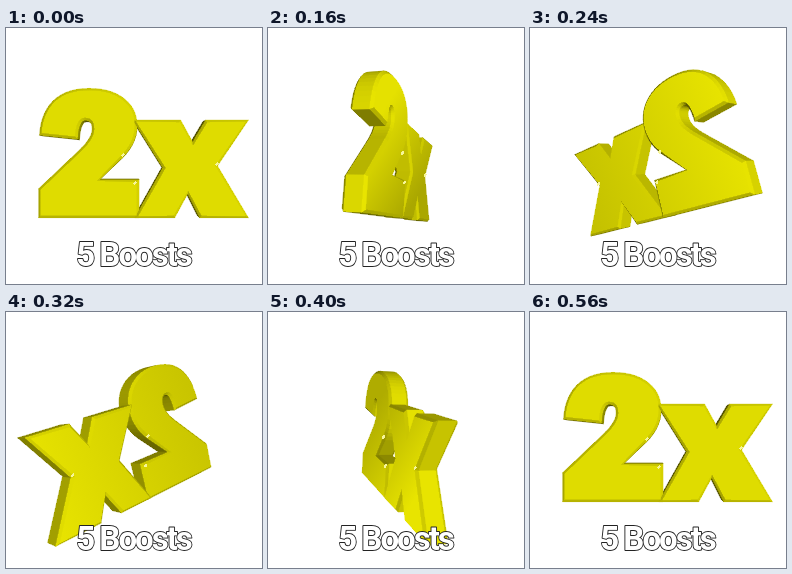
Write an HTML page that moves like this. It is 256 px wide and 256 px high and loops after 600 ms.

```html
<!DOCTYPE html>
<html>
<head>
<meta charset="utf-8">
<style>
  html, body { margin: 0; width: 100%; height: 100%; overflow: hidden; background: #fff; }
  svg { display: block; width: 100vw; height: 100vh; }
  text {
    font: 700 33px "Roboto", "Liberation Sans", sans-serif;
    font-stretch: 75%; letter-spacing: -2px;
    fill: #fff; stroke: #222; stroke-width: 1.8; stroke-linejoin: round;
    paint-order: stroke; text-anchor: middle;
  }
</style>
</head>
<body>
<svg viewBox="0 0 256 256">
  <defs>
    <linearGradient id="face" gradientUnits="userSpaceOnUse">
      <stop offset="0"/><stop offset="1"/>
    </linearGradient>
  </defs>
  <g id="solid" stroke-width=".6" stroke-linejoin="round" shape-rendering="crispEdges"></g>
  <text x="127.5" y="238">5 Boosts</text>
</svg>
<script>
const STEP = 40, STEPS = 15, MID = 128, CAMERA = 400;
const HALF = 10, BEVEL = 2.5, FIT = 1 - HALF / CAMERA;
const solid = document.getElementById('solid');
const gradient = document.getElementById('face');

// Outlines run clockwise: [x, y] is a line, [cx, cy, x, y] a quadratic curve.
const two = [[33, 107], [34, 86, 46, 73], [59, 60, 83, 60], [106, 60, 119, 71], [131, 81, 131, 97],
  [131, 115, 116, 130], [93, 152], [133, 152], [133, 190], [32, 190], [32, 161], [72, 123],
  [86, 110, 86, 101], [86, 92, 79, 92], [72, 92, 71, 111]];
const ex = [[127, 92], [175, 92], [187, 114], [200, 92], [243, 92], [212, 138], [243, 190],
  [194, 190], [182, 166], [169, 190], [129, 190], [157, 140]];
const glints = [[117, 127], [129, 155], [211, 136]];

const ease = p => p * p * (3 - 2 * p);
const local = ([x, y]) => [(x - MID) * FIT, (y - MID) * FIT];

function flatten(path) {
  const out = [];
  let [px, py] = path[0];
  for (const seg of path) {
    const [x, y] = seg.slice(-2);
    if (seg.length === 2) out.push([x, y]);
    else for (let i = 1; i <= 7; i++) {
      const t = i / 7, a = (1 - t) ** 2, b = 2 * t * (1 - t), c = t * t;
      out.push([a * px + b * seg[0] + c * x, a * py + b * seg[1] + c * y]);
    }
    [px, py] = [x, y];
  }
  return out.map(local);
}

function makeGlyph(path) {
  const pts = flatten(path), n = pts.length;
  const normals = pts.map((p, i) => {
    const q = pts[(i + 1) % n], dx = q[0] - p[0], dy = q[1] - p[1], l = Math.hypot(dx, dy);
    return [dy / l, -dx / l];
  });
  const inner = pts.map((p, i) => {
    const a = normals[(i + n - 1) % n], b = normals[i];
    const k = BEVEL / Math.max(0.6, 1 + a[0] * b[0] + a[1] * b[1]);
    return [p[0] - (a[0] + b[0]) * k, p[1] - (a[1] + b[1]) * k];
  });
  const ring = (list, z) => list.map(p => [...p, z]);
  const edge = HALF - BEVEL;
  return { normals, rings: [ring(inner, HALF), ring(pts, edge), ring(pts, -edge), ring(inner, -HALF)] };
}

const glyphs = [two, ex].map(makeGlyph);

function turner(spin, roll) {
  const c = Math.cos(spin), s = Math.sin(spin), cr = Math.cos(roll), sr = Math.sin(roll);
  return ([x, y, z]) => {
    const u = x * cr - y * sr, v = x * sr + y * cr;
    return [u * c + z * s, v, z * c - u * s];
  };
}

function project([x, y, z]) {
  const k = CAMERA / (CAMERA - z);
  return [MID + x * k, MID + y * k];
}

function area(poly) {
  return poly.reduce((sum, [x, y], i) => {
    const [u, v] = poly[(i + 1) % poly.length];
    return sum + x * v - u * y;
  }, 0);
}

function yellow(k) {
  k = Math.min(1, k);
  return `rgb(${Math.round(232 * k)},${Math.round(228 * k)},0)`;
}

// Sides take light from the right; nearer parts are brighter.
function sideColor([x, y, z], depth) {
  const lit = Math.max(0, z * 0.92 + x * 0.28 - y * 0.1);
  return yellow(0.36 + 0.62 * Math.min(1, lit) ** 0.7 + depth * 0.0006);
}

function lightFace(turn, z, facing) {
  [-96, 116].forEach((x, i) => {
    const end = turn([x, 0, z]), [px, py] = project(end);
    gradient.setAttribute('x' + (i + 1), px);
    gradient.setAttribute('y' + (i + 1), py);
    gradient.children[i].setAttribute('stop-color', yellow(0.83 + 0.12 * facing + end[2] * 0.0013));
  });
}

const pathOf = poly => 'M' + poly.map(p => p.map(v => v.toFixed(2)).join()).join('L') + 'Z';
const shape = (poly, color) => `<path d="${pathOf(poly)}" fill="${color}" stroke="${color}"/>`;

function render(p) {
  const spin = 2 * Math.PI * ease(p);
  const roll = 17.5 * Math.PI / 180 * ease(1 - Math.abs(2 * p - 1));
  const turn = turner(spin, roll);
  const sides = [];
  let caps = '';
  for (const { normals, rings } of glyphs) {
    const world = rings.map(r => r.map(turn)), flat = world.map(r => r.map(project));
    const n = normals.length;
    for (let r = 0; r < 3; r++) for (let i = 0; i < n; i++) {
      const j = (i + 1) % n;
      const poly = [flat[r + 1][i], flat[r + 1][j], flat[r][j], flat[r][i]];
      if (area(poly) <= 0) continue;
      const tilt = 1 - r, k = tilt ? Math.SQRT1_2 : 1;
      const normal = turn([normals[i][0] * k, normals[i][1] * k, tilt * k]);
      const depth = (world[r][i][2] + world[r][j][2] + world[r + 1][i][2] + world[r + 1][j][2]) / 4;
      sides.push({ depth, svg: shape(poly, sideColor(normal, depth)) });
    }
    if (area(flat[0]) > 0) caps += shape(flat[0], 'url(#face)');
    if (area(flat[3]) < 0) caps += shape(flat[3], 'url(#face)');
  }
  sides.sort((a, b) => a.depth - b.depth);
  const front = Math.cos(spin) > 0 ? HALF : -HALF;
  lightFace(turn, front, Math.abs(Math.cos(spin)));
  const spots = glints.map(g => {
    const [x, y] = project(turn([...local(g), front]));
    return `<ellipse cx="${x}" cy="${y}" rx="1.3" ry="2" fill="#f6f59a" transform="rotate(35 ${x} ${y})"/>`;
  }).join('');
  solid.innerHTML = sides.map(s => s.svg).join('') + caps + spots;
}

let shown = -1;
function tick() {
  const step = Math.floor(performance.now() / STEP) % STEPS;
  if (step !== shown) render((shown = step) / (STEPS - 1));
  requestAnimationFrame(tick);
}
tick();
</script>
</body>
</html>
```
